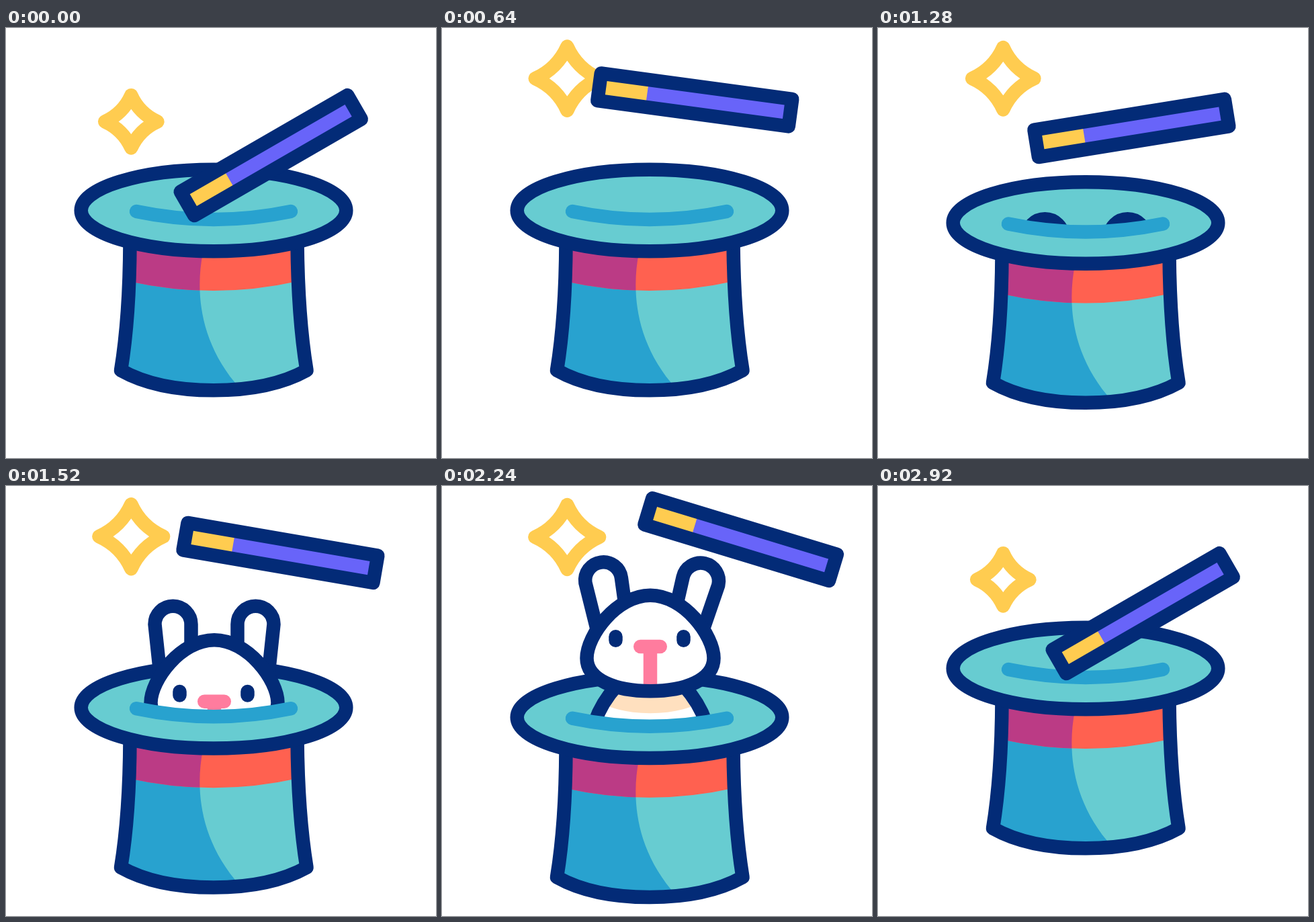
Animation, 640 px wide and 640 px high, one loop 3000 ms. Source, as an HTML page with a canvas:

```html
<!DOCTYPE html>
<html lang="en">
<head>
<meta charset="utf-8">
<title>Magic hat</title>
<style>
html, body { margin: 0; width: 100%; height: 100%; overflow: hidden; background: #fff; }
canvas { display: block; width: 640px; height: 640px; }
</style>
</head>
<body>
<canvas id="stage" width="640" height="640"></canvas>
<script>
const ctx = document.getElementById('stage').getContext('2d');
const LOOP = 3000, STEP = 40, LINE = 20.5;
const NAVY = '#032b77', TEAL = '#67ccd1', BLUE = '#28a2cf', RED = '#ff6150',
  PLUM = '#bb3b85', GOLD = '#ffcc50', VIOLET = '#6864f9', PINK = '#ff7c9e',
  PEACH = '#ffe0bf', WHITE = '#fff';

const clamp = x => Math.min(1, Math.max(0, x));
const smooth = x => x * x * (3 - 2 * x);
const easeOut = x => 1 - (1 - x) * (1 - x);
const radians = degrees => degrees * Math.PI / 180;

// The wand rises, taps the rim, pulls the rabbit up, then all return.
function pose(t) {
  const ramp = (from, to, ease = smooth) => ease(clamp((t - from) / (to - from)));
  const lift = ramp(0, 600), tap = ramp(600, 1200), pull = ramp(1200, 1800, easeOut);
  const sway = ramp(1250, 1800), back = ramp(2200, 2800), sink = ramp(2200, 2645);
  const pulse = ramp(200, 700) - ramp(700, 980) + ramp(980, 1400) - ramp(2260, 2800);
  return {
    starY: 139.3 - 64.1 * (lift - back),
    starSize: 39.1 + 8.8 * pulse,
    angle: -30 + 38 * lift - 26 * tap + 35.5 * pull - 47.5 * back,
    wandX: 518.5 + 64.5 * (sway - ramp(2200, 2720)),
    wandY: 117.8 + 8.3 * ramp(0, 400) - 4.7 * sway - 3.6 * sink,
    drop: 74.4 * (pull - sink),
    rise: ramp(1200, 1750) - sink
  };
}

const shape = d => new Path2D(d);
const hat = shape('M184.5 318Q184 430 171 509.5C211 532 259 539.3 309 539.3' +
  'S407 532 447.5 509.5Q434.5 430 433.5 318Z');
const rim = new Path2D();
rim.ellipse(309, 271.5, 197.3, 60.8, 0, 0, 2 * Math.PI);
const band = shape('M183 300H434V377Q309 405 183 377Z');
const shade = shape('M150 300H297L293 335C283 385 285 460 341 528L352 545H150Z');
const crease = shape('M194 273Q309 297 424 273');
const opening = shape('M0 -200H640V273H424Q309 297 194 273H0Z');
const head = shape('M0 10.5C50 10.5 94.5 70 94.5 104C94.5 136 52 153 0 153' +
  'S-94.5 136 -94.5 104C-94.5 70 -50 10.5 0 10.5Z');
const body = shape('M-50 145Q-73 171 -82 198Q-90 225 -90 260H90Q90 225 82 198Q73 171 50 145Z');
const ear = shape('M-80.5 62L-88.5 -13A27 27 0 0 1 -34.5 -13V32');

function fill(path, color) {
  ctx.fillStyle = color;
  ctx.fill(path);
}

function stroke(path, color) {
  ctx.strokeStyle = color;
  ctx.lineWidth = LINE;
  ctx.stroke(path);
}

function outlined(path, color) {
  fill(path, color);
  stroke(path, NAVY);
}

function box(x, y, w, h, color) {
  ctx.fillStyle = color;
  ctx.fillRect(x, y, w, h);
}

function pill(x, y, w, h, color) {
  const path = new Path2D();
  path.roundRect(x - w / 2, y - h / 2, w, h, Math.min(w, h) / 2);
  fill(path, color);
}

function group(draw) {
  ctx.save();
  draw();
  ctx.restore();
}

function drawStar(y, size) {
  const waist = 0.31 * size, star = new Path2D();
  star.moveTo(size, 0);
  for (let i = 1; i <= 4; i++) {
    const a = i * Math.PI / 2, b = a - Math.PI / 4, r = waist * Math.SQRT2;
    star.quadraticCurveTo(r * Math.cos(b), r * Math.sin(b), size * Math.cos(a), size * Math.sin(a));
  }
  star.closePath();
  group(() => {
    ctx.translate(186.3, y);
    stroke(star, GOLD);
  });
}

function drawHat() {
  group(() => {
    ctx.clip(hat);
    fill(hat, TEAL);
    fill(shade, BLUE);
    fill(band, RED);
    ctx.clip(shade);
    fill(band, PLUM);
  });
  stroke(hat, NAVY);
  outlined(rim, TEAL);
}

function drawEar(side, degrees) {
  group(() => {
    ctx.scale(side, 1);
    ctx.translate(-58, 48);
    ctx.rotate(radians(-degrees));
    ctx.translate(58, -48);
    outlined(ear, WHITE);
  });
}

function drawRabbit(y, perk) {
  const face = 90 - 15.5 * perk;
  ctx.translate(310, y);
  fill(body, WHITE);
  group(() => {
    ctx.clip(body);
    ctx.translate(0, 33);
    fill(head, PEACH);
  });
  stroke(body, NAVY);
  drawEar(1, 8 * perk);
  drawEar(-1, 13 * perk);
  fill(head, WHITE);
  group(() => {
    ctx.clip(head);
    box(-LINE / 2, face + 12, LINE, 90, PINK);
  });
  pill(0, face + 12, 50, LINE, PINK);
  for (const side of [-1, 1]) pill(50.5 * side - 1, face, LINE, 26, NAVY);
  stroke(head, NAVY);
}

function drawWand(x, y, degrees) {
  group(() => {
    ctx.translate(x, y);
    ctx.rotate(radians(degrees));
    box(-287, -LINE, 287, 2 * LINE, VIOLET);
    box(-287, -LINE, 72, 2 * LINE, GOLD);
    stroke(shape(`M-287 ${-LINE}H0V${LINE}H-287Z`), NAVY);
  });
}

function render(t) {
  const { starY, starSize, angle, wandX, wandY, drop, rise } = pose(t);
  box(0, 0, 640, 640, WHITE);
  ctx.lineCap = ctx.lineJoin = 'round';
  drawStar(starY, starSize);
  group(() => {
    ctx.translate(0, drop);
    drawHat();
    group(() => {
      ctx.clip(opening);
      drawRabbit(335 - 187 * rise - drop, smooth(clamp((rise - 0.64) / 0.36)));
    });
    stroke(crease, BLUE);
  });
  drawWand(wandX, wandY, angle);
}

function tick() {
  const t = performance.now() % LOOP;
  render(Math.floor(t / STEP) * STEP);
  requestAnimationFrame(tick);
}
tick();
</script>
</body>
</html>
```
